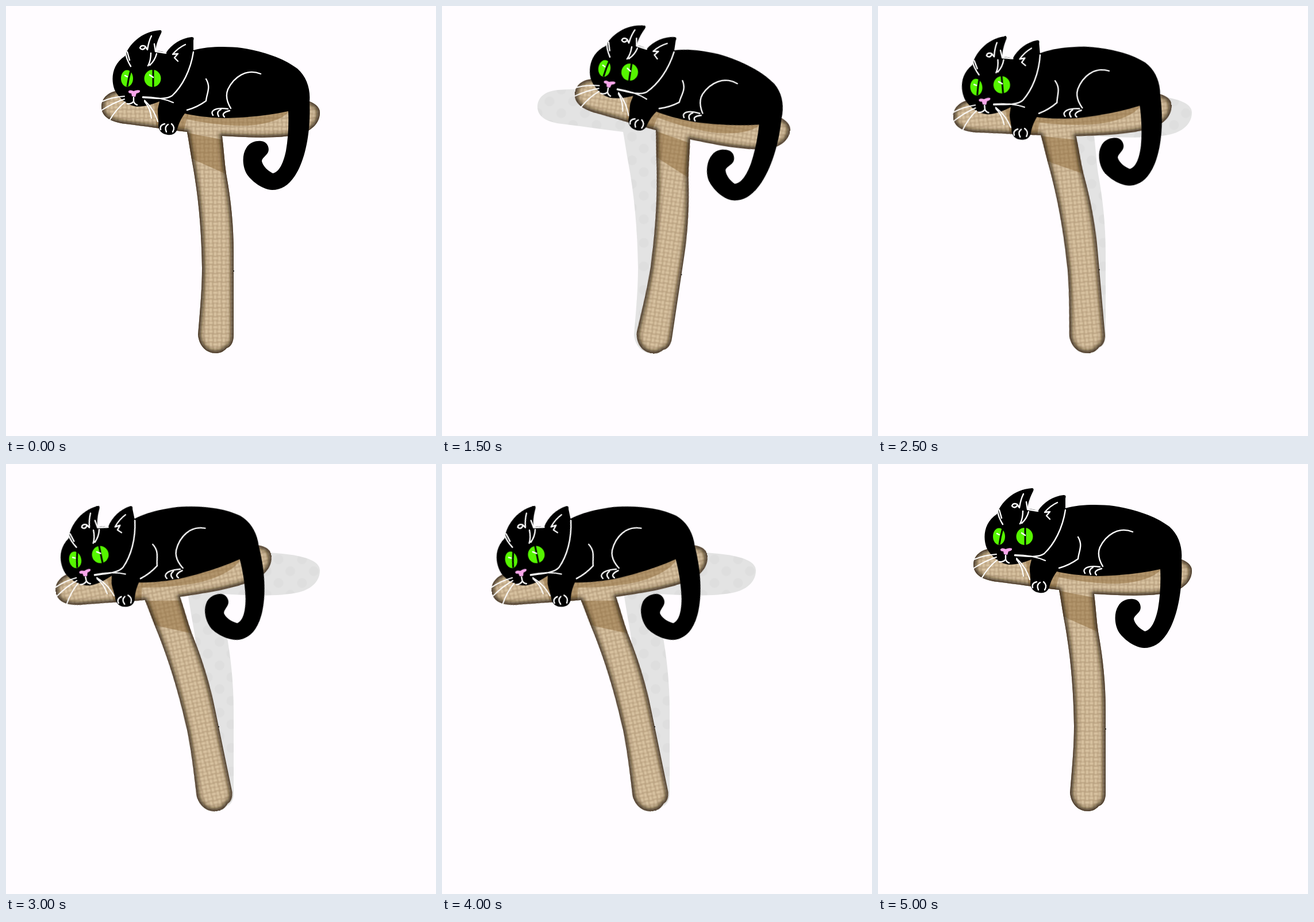
An HTML page for the animation above (5.5 s loop, 748 by 748 pixels).

```html
<!DOCTYPE html>
<html lang="en">
<head>
<meta charset="utf-8">
<title>Cat on a swaying post</title>
<style>
  html, body { margin: 0; width: 100%; height: 100%; overflow: hidden; background: #fffcff; }
  svg { display: block; width: 100vw; height: 100vh; }

  .sway {
    transform-box: view-box;
    animation: sway 5.5s step-end infinite;
  }

  /* eleven held poses of 500 ms */
  @keyframes sway {
    0%      { transform: rotate(0deg);     transform-origin: 364px 602px; }
    9.09%   { transform: rotate(8.5deg);   transform-origin: 364px 602px; }
    18.18%  { transform: rotate(13.5deg);  transform-origin: 364px 602px; }
    27.27%  { transform: rotate(8.5deg);   transform-origin: 364px 602px; }
    36.36%  { transform: rotate(0deg);     transform-origin: 364px 586px; }
    45.45%  { transform: rotate(-5deg);    transform-origin: 364px 586px; }
    54.54%  { transform: rotate(-11.7deg); transform-origin: 364px 586px; }
    63.63%  { transform: rotate(-17.8deg); transform-origin: 364px 586px; }
    72.72%  { transform: rotate(-11.7deg); transform-origin: 364px 586px; }
    81.81%  { transform: rotate(-5deg);    transform-origin: 364px 586px; }
    90.9%, 100% { transform: rotate(0deg); transform-origin: 364px 586px; }
  }

  .ink { fill: none; stroke: #fff; stroke-width: 2.4; stroke-linecap: round; stroke-linejoin: round; }
  .thin { stroke-width: 2; }
  .shade { fill: #86602f; fill-opacity: .46; }
</style>
</head>
<body>
<svg viewBox="0 0 748 748">
  <defs>
    <path id="stand" d="M166 175 C166 160 178 148 202 146 C290 140 400 151 470 155
      C510 158 546 166 546 185 C546 203 533 217 510 223 C475 231 425 229 376 226
      C379 250 380 272 383 292 C391 335 396 380 396 430 L396 572
      C396 585 391 593 384 595 C378 602 371 604 365 604 C349 604 336 592 334 572
      C337 535 341 495 341 455 C340 390 335 330 323 267 C320 250 318 235 315 219
      C275 214 240 209 208 205 C184 202 166 194 166 175 Z"/>
    <clipPath id="inside"><use href="#stand"/></clipPath>
    <filter id="soft" x="-10%" y="-10%" width="120%" height="120%">
      <feGaussianBlur stdDeviation="3.5"/>
    </filter>
    <filter id="fuzz"><feGaussianBlur stdDeviation="1"/></filter>

    <pattern id="weave" width="15" height="15" patternUnits="userSpaceOnUse">
      <rect width="15" height="15" fill="#b8a07f"/>
      <g fill="#dbc6a4" filter="url(#fuzz)">
        <rect x="0" y="1.5" width="8" height="4.500" rx="2"/>
        <rect x="7.500" y="9" width="7.500" height="4.500" rx="2"/>
        <rect x="9" y="0" width="4.500" height="8" rx="2"/>
        <rect x="1.500" y="7.500" width="4.500" height="7.500" rx="2"/>
      </g>
    </pattern>
    <pattern id="dots" x="330.5" y="227.5" width="41" height="41" patternUnits="userSpaceOnUse">
      <rect width="41" height="41" fill="#e3e3e3"/>
      <g fill="#dedede">
        <circle cx="20.5" cy="20.5" r="8.5"/>
        <circle r="8.5"/><circle cx="41" r="8.5"/>
        <circle cy="41" r="8.5"/><circle cx="41" cy="41" r="8.5"/>
      </g>
    </pattern>
  </defs>

  <rect width="748" height="748" fill="#fffcff"/>
  <use href="#stand" fill="url(#dots)"/>

  <g class="sway">
    <!-- post and platform -->
    <use href="#stand" fill="url(#weave)"/>
    <g clip-path="url(#inside)">
      <path class="shade" d="M316 186 L495 180 C485 196 455 206 420 208 C385 209 350 204 314 197 Z"/>
      <path class="shade" d="M256 160 L320 180 L314 197 L309 219 L262 212 Z"/>
      <path class="shade" d="M314 220 C335 225 355 228 378 233 L384 293 L322 265 Z"/>
      <use href="#stand" fill="none" stroke="#2c2013" stroke-width="9" stroke-opacity=".85" filter="url(#soft)"/>
      <use href="#stand" fill="none" stroke="#3c2f20" stroke-width="2" stroke-opacity=".55"/>
    </g>
    <circle cx="396" cy="461" r="1"/>

    <!-- body, tail, head and front leg -->
    <path d="M326 77 C350 70 385 70 410 73 C450 79 485 92 507 109 C523 123 530 145 528 166
      C530 205 525 250 510 282 C497 309 482 320 463 320 C446 319 429 306 420 294
      C411 281 410 259 418 247 C424 237 434 234 444 235 C454 236 459 246 456 254
      C453 261 445 264 445 270 C447 279 456 287 464 291 C476 289 483 271 487 252
      C491 230 492 205 491 183 C455 191 420 194 380 195 C350 194 328 191 311 187
      C304 196 300 206 298 214 C295 223 288 225 281 224 C271 223 265 216 265 207
      C266 199 264 191 264 183 C264 176 266 172 267 166 C255 171 242 175 229 175
      C212 174 196 160 189 146 C182 128 184 102 207 87 C213 68 235 44 268 42
      C271 42 271 45 270 47 C265 57 261 67 260 78 C267 78 273 79 278 82
      C288 66 305 56 323 54 C327 54 327 56 326 60 Z"/>

    <!-- eyes -->
    <g fill="#55f500">
      <ellipse cx="210.500" cy="126" rx="10.500" ry="14.500"/>
      <ellipse cx="255" cy="126" rx="14.500" ry="15"/>
    </g>
    <path d="M217 112 Q213 126 211 140 M256 111 L256 141" fill="none" stroke="#000" stroke-width="3"/>
    <path class="ink" d="M207 121 L211 123 M250 120 L256 124"/>

    <!-- nose and mouth -->
    <path d="M213 148 Q216 145 222 148 Q229 145 233 147 Q234 151 227 152 L225 158 L219 157 L218 152 Q212 152 213 148 Z" fill="#f7a6ea"/>
    <path class="ink" d="M222 159 L222 166 Q218 171 211 170 M222 166 Q224 171 228 172"/>

    <!-- whiskers -->
    <path class="ink thin" d="M206 157 Q186 158 167 166 M206 162 Q187 168 167 181 M207 167 Q191 180 180 199
      M241 164 Q258 180 264 201 M241 166 Q251 178 253 195 M238 158 Q268 158 291 168"/>

    <!-- ear marks and forehead stripes -->
    <path class="ink" d="M253 52 Q248 62 246 76 L242 70 Q235 67 233 73 Q238 79 243 71 M258 66 L260 79 L278 82"/>
    <path class="ink" d="M312 67 Q299 73 290 84 L299 83 L293 90 L299 96"/>
    <path class="ink" d="M208 81 Q209 92 217 105 M211 80 L215 94 M247 104 Q252 95 252 82 M250 103 Q259 95 262 83"/>

    <!-- neck, arm and haunch -->
    <path class="ink" d="M326 80 C321 112 307 139 289 156 C277 164 257 160 238 159"/>
    <path class="ink" d="M348 127 C357 142 349 152 348 165 Q333 176 315 181"/>
    <path class="ink" d="M443 118 C418 108 396 124 386 145 C381 157 385 168 391 178"/>

    <!-- toes -->
    <path class="ink" d="M360 190 C354 182 365 176 386 179 M370 192 Q365 184 374 180 M380 193 Q373 186 389 182"/>
    <path class="ink" d="M269 215 Q267 207 276 205 M279 219 Q275 210 282 206 M290 219 Q295 211 288 205"/>
  </g>
</svg>
</body>
</html>
```
